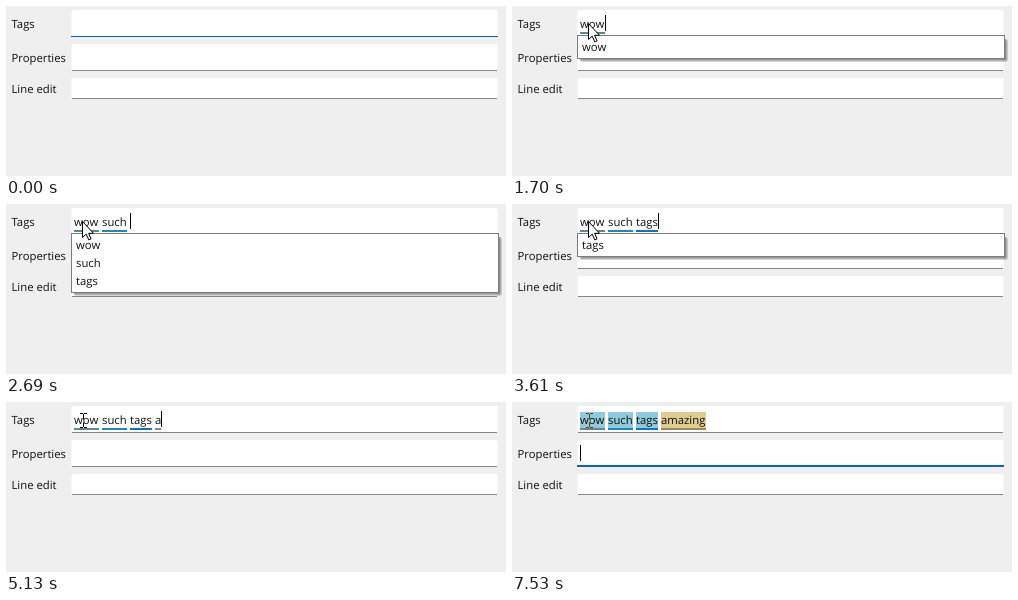
An HTML page for the animation above (8 s loop, 500 by 170 pixels).

```html
<!DOCTYPE html>
<html lang="en">
<head>
<meta charset="utf-8">
<title>Tag input</title>
<style>
  html, body { margin: 0; width: 100%; height: 100%; overflow: hidden; background: #efefef; }
  svg { display: block; width: 500px; height: 170px; }
  text { font: 11.3px "Open Sans", "Noto Sans", sans-serif; fill: #111; text-rendering: geometricPrecision; white-space: pre; }
</style>
</head>
<body>
<svg id="stage" viewBox="0 0 500 170"></svg>
<script>
const LOOP = 8000, BLINK = 530, FOCUS_ANIM = 270;
const ACCENT = '#0067b8', LINE = '#868686';
const stage = document.getElementById('stage');

function add(parent, name, attrs, content) {
  const el = document.createElementNS('http://www.w3.org/2000/svg', name);
  set(el, attrs);
  if (content !== undefined) el.textContent = content;
  parent.append(el);
  return el;
}
function set(el, attrs) {
  for (const key in attrs) el.setAttribute(key, attrs[key]);
}
function show(el, on) {
  el.style.visibility = on ? 'visible' : 'hidden';
}
const rect = (parent, x, y, width, height, fill, more) =>
  add(parent, 'rect', { x, y, width, height, fill, ...more });
const label = (parent, x, y, content) => add(parent, 'text', { x, y }, content);

rect(stage, 0, 0, 500, 170, '#efefef');

// Form rows
const fields = [['Tags', 4, 31, 22], ['Properties', 38, 65, 56], ['Line edit', 72, 93, 87]]
  .map(([name, top, bottom, base]) => {
    label(stage, 5.5, base, name);
    rect(stage, 65.5, top, 426, bottom - top, '#fff', { rx: 1.5 });
    return { top, bottom, line: rect(stage, 66, bottom - 1, 425, 1, LINE) };
  });

// Tags: start, end, underline and chip colours
const tags = [
  ['wow', 68, 93, '#64868f', '#90cadd'],
  ['such', 96, 121, '#2587b3', '#90cadd'],
  ['tags', 124, 146, '#1773b4', '#90cadd'],
  ['amazing', 149, 194, '#a0885a', '#dfcc92'],
].map(([word, x, end, color, fill]) => ({
  word, x, end, color,
  chip: rect(stage, x, 10, end - x, 17, fill),
  under: rect(stage, x, 26, 0, 2, color),
  text: label(stage, x, 22, ''),
}));

const caret = rect(stage, 68, 9, 1, 16, '#000');

// Completion popup
const popup = add(stage, 'g', {});
const shadows = [0, 1, 2, 3].map(i =>
  rect(popup, 69 - i / 2, 33, 424 + i * 1.5, 0, '#000', { opacity: 0.16, rx: i }));
const frame = rect(popup, 65.5, 29.5, 427, 23, '#fff', { stroke: '#7b7d84' });
const mark = add(popup, 'g', {});
rect(mark, 67, 33, 423, 16, '#ebebeb', { rx: 2 });
const markBar = rect(mark, 67, 35, 2, 12, ACCENT, { rx: 1 });
const rows = [0, 1, 2].map(i => label(popup, 70, 45 + i * 18, ''));

// Mouse pointers
const arrow = add(stage, 'path', {
  d: 'M0 0V16L3.7 12.6 6.3 18.4 8.6 17.4 6.1 11.8H11Z',
  fill: '#fff', stroke: '#000', 'stroke-width': 1, 'stroke-linejoin': 'round',
});
const beam = add(stage, 'path', {
  d: 'M-3 -6.5H0M1 -6.5H4M.5 -6V7M-3 7.5H0M1 7.5H4',
  stroke: '#fff', fill: 'none',
});
beam.style.mixBlendMode = 'difference';

const TYPED = 'wow such tags amazing';
const KEYS = [
  1490, 1560, 1700, 2040,
  2240, 2370, 2440, 2570, 2690,
  3220, 3350, 3480, 3610, 4870,
  5130, 5260, 5330, 5530, 5660, 5730, 6060,
];
const PICK = 3940, PICKED = 4270, LEAVE = 6390;

function suggestions(t, typed) {
  if (!typed || (t >= PICKED && t < 4870)) return [];
  const prefix = typed.split(' ').pop();
  return ['wow', 'such', 'tags'].filter(w => w.startsWith(prefix));
}

function drawTags(t, typed) {
  const words = typed.split(' ');
  let caretX = 68;
  tags.forEach((tag, i) => {
    const part = words[i] || '';
    if (tag.text.textContent !== part) tag.text.textContent = part;
    const done = part === tag.word;
    const end = done ? tag.end : tag.x + (part ? tag.text.getComputedTextLength() : 0);
    set(tag.under, { width: end - tag.x, fill: done ? tag.color : '#8a8d8f' });
    show(tag.chip, t >= LEAVE);
    if (i === words.length - 1) caretX = Math.round(end);
  });
  return caretX;
}

function drawPopup(t, items) {
  show(popup, items.length > 0);
  const picked = items.length > 0 && t >= PICK && t < PICKED;
  show(mark, picked);
  show(markBar, picked && t >= 4070);
  for (const row of rows) row.textContent = items[rows.indexOf(row)] || '';
  const height = items.length * 18 + 5;
  set(frame, { height });
  shadows.forEach((s, i) => set(s, { height: height - 3 + i }));
}

function drawFocus(field, since) {
  const on = since !== null;
  const h = on ? 1 + Math.min(1, Math.max(0, since / FOCUS_ANIM)) : 1;
  set(field.line, {
    x: on ? 65 : 66, width: on ? 427 : 425,
    y: field.bottom - h, height: h, fill: on ? ACCENT : LINE,
  });
}

function drawCaret(t, count, tagX) {
  let start = 160;
  if (count) start = KEYS[count - 1];
  if (t >= PICKED && t < 4870) start = 4340;
  if (t >= LEAVE) start = 6470;
  const on = t >= start && Math.floor((t - start) / BLINK) % 2 === 0;
  set(caret, t >= LEAVE ? { x: 68, y: 43 } : { x: tagX, y: 9 });
  show(caret, on);
}

function drawPointer(t, popupOpen) {
  const p = Math.min(1, Math.max(0, (t - 70) / 690));
  const k = p * p * (3 - 2 * p);
  const x = Math.round(63 + 13 * k);
  const y = Math.round(145 - 128 * k);
  const over = x >= 66 && fields.some(f => y >= f.top && y < f.bottom);
  const useBeam = over && !popupOpen;
  set(arrow, { transform: `translate(${x + 0.5} ${y + 0.5})` });
  set(beam, { transform: `translate(${x + 1} ${y + 1})` });
  show(arrow, t >= 70 && !useBeam);
  show(beam, t >= 70 && useBeam);
}

function draw(t) {
  const count = KEYS.filter(k => k <= t).length;
  const typed = TYPED.slice(0, count);
  const items = suggestions(t, typed);
  const tagX = drawTags(t, typed);
  drawPopup(t, items);
  drawFocus(fields[0], t < 1490 ? t : t >= PICKED && t < 4870 ? t - PICKED : null);
  drawFocus(fields[1], t >= LEAVE ? t - LEAVE : null);
  drawCaret(t, count, tagX);
  drawPointer(t, items.length > 0);
}

const began = performance.now();
function tick() {
  draw((performance.now() - began) % LOOP);
  requestAnimationFrame(tick);
}
tick();
</script>
</body>
</html>
```
